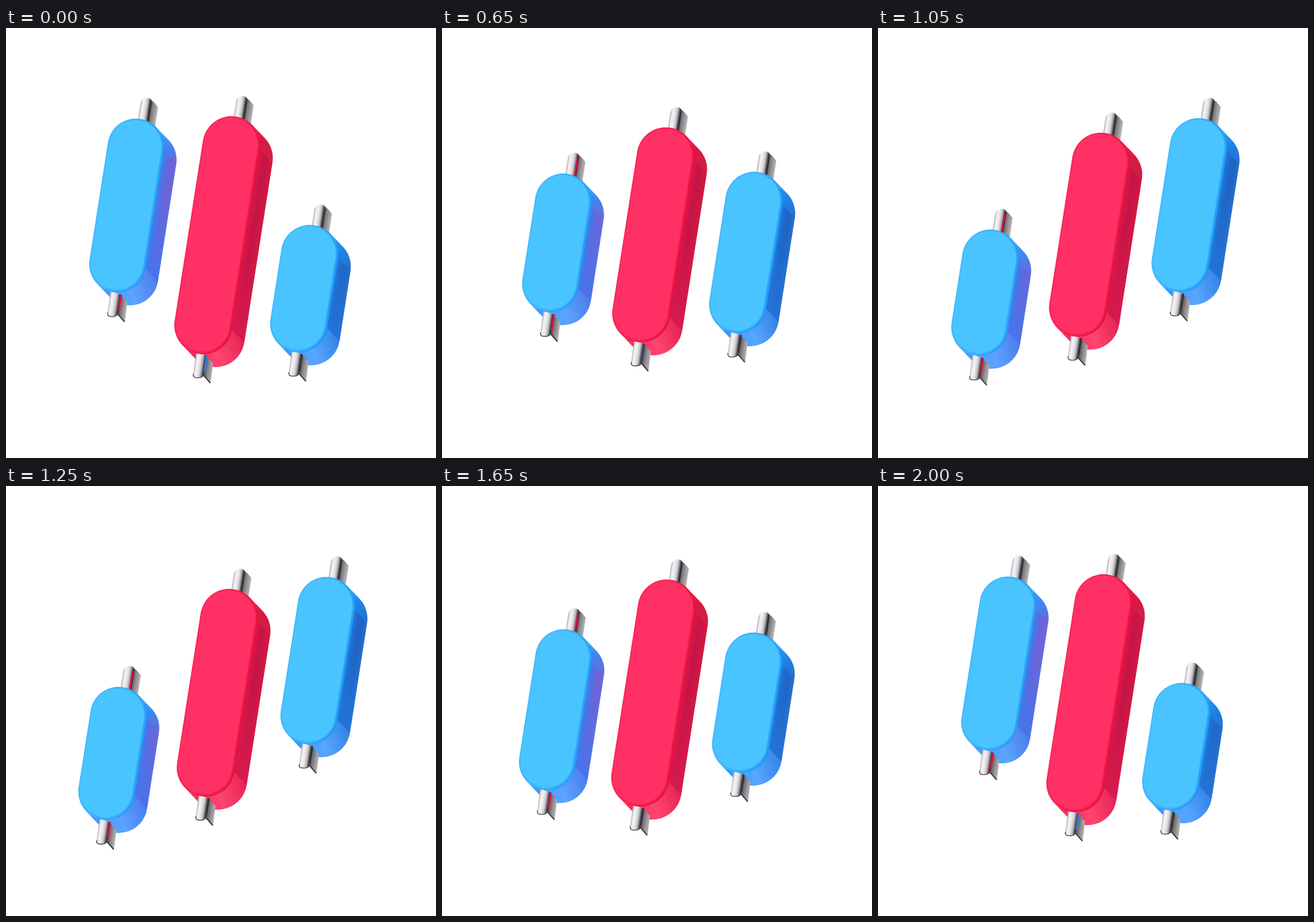
Animation, 700 px wide and 700 px high, one loop 2050 ms. Source, as an HTML page:

```html
<!DOCTYPE html>
<html lang="en">
<head>
<meta charset="utf-8">
<title>Candles</title>
<style>
  html, body { margin: 0; width: 100%; height: 100%; overflow: hidden; background: #fff; }
  svg { display: block; width: 100%; height: 100%; }
</style>
</head>
<body>
<svg id="stage" viewBox="0 0 700 700"></svg>
<script>
const STEP = 50, FRAMES = 41, CYCLE = 40;
const LEAN = 0.157;              // sideways drift per pixel of height
const DEPTH = [20, 21];          // offset from front face to back face
const ACROSS = [0.988, 0.155];   // unit vector across a candle
const EDGE = [0.724, -0.69];     // where the silhouette leaves the front face

// Each end swings as mean + c * cos + s * sin.
const candles = [
  { id: 'left', x: 212.1, r: 46.2, top: [235, -87.5, -42.5], bottom: [479, -48.5, -43],
    face: '#4ac4ff', rim: ['#41b6ff', '#35acff', '#259bf8'],
    flat: ['#3f7cee', '#5b6be0', '#7560d2', '#5f6de2'], low: '#4376ec',
    cap: ['#3aaeff', '#3f86f0', '#6a68da'], foot: ['#4a78ec', '#5ba4ff', '#3f97fb'], glow: '#e0103f' },
  { id: 'middle', x: 367.3, r: 47.2, top: [157, -13.4, -1.5], bottom: [516.8, 14.2, 1.5],
    face: '#ff3164', rim: ['#f92355', '#f31d4d', '#e5123f'],
    flat: ['#d9164a', '#c61447', '#cb1545', '#d11a42'], low: '#d81a50',
    cap: ['#f01e4a', '#d61a42', '#d02146'], foot: ['#e32050', '#ff4570', '#f72350'], glow: '#2f7cf0' },
  { id: 'right', x: 522.4, r: 46.8, top: [236.3, 84.3, 40.5], bottom: [481.8, 46.2, 40.5],
    face: '#4ac4ff', rim: ['#41b6ff', '#35acff', '#1f98f6'],
    flat: ['#1f78dc', '#1d66c8', '#2064c2', '#2670d0'], low: '#2474d8',
    cap: ['#36aaff', '#1d83e6', '#2570cc'], foot: ['#2f80e4', '#58a6ff', '#2b96fb'], glow: '#1c1b22' }
];

const stage = document.getElementById('stage');
const find = id => document.getElementById(id);
const clamp = v => Math.max(0, Math.min(1, v));
const scale = ([x, y], k) => [x * k, y * k];
const plus = (a, b) => [a[0] + b[0], a[1] + b[1]];
const pt = p => p.map(v => v.toFixed(2)).join(' ');

function gradient(id, colours, from, to) {
  const box = from
    ? `gradientUnits="userSpaceOnUse" x1="${from[0]}" y1="${from[1]}" x2="${to[0]}" y2="${to[1]}"` : '';
  const stops = colours.map((c, i) =>
    `<stop offset="${i / (colours.length - 1)}" stop-color="${c}"/>`).join('');
  return `<linearGradient id="${id}" ${box}>${stops}</linearGradient>`;
}

// A strip of the side wall: an arc on the front circle swept back by DEPTH.
function wedge(r, from, to) {
  const a = scale(from, r), b = scale(to, r);
  return `M${pt(a)}L${pt(plus(a, DEPTH))}A${r} ${r} 0 0 1 ${pt(plus(b, DEPTH))}L${pt(b)}` +
    `A${r} ${r} 0 0 0 ${pt(a)}Z`;
}

const topPin = c => `<g transform="skewX(-8.8)">
  <path d="M11 -78L18 -73L26 -65V-18L12 -30Z" fill="url(#shade)"/>
  <path d="M-3.5 -30V-71Q-3.5 -80 5.5 -80Q14.5 -80 14.5 -71V-30Z" fill="url(#steel)"/>
  <path id="${c.id}TopGlow" d="M10.6 -30V-72Q13.6 -72 13.6 -68V-30Z" fill="${c.glow}" opacity="0"/>
</g>`;

const bottomPin = c => `<g transform="skewX(-8.8)">
  <path d="M12 50L25.5 62L26.5 95L12 81Z" fill="url(#shade)"/>
  <path d="M12.5 81L26 94" stroke="#3b393f" stroke-width="1.8"/>
  <path d="M-4.5 44L14 50V78Q14 86 6 86H3Q-4 86 -4 80Z" fill="url(#steel)"/>
  <path d="M-4 79Q-4 85.5 3 85.5H6Q13.5 85.5 13.5 77" fill="none" stroke="#4a474d" stroke-width="1.3"/>
  <path id="${c.id}BottomGlow" d="M12 50H15V76H12Z" fill="${c.glow}" opacity="0"/>
</g>`;

function build(c) {
  const { id, r } = c;
  const side = scale(ACROSS, r);
  const defs = gradient(id + 'RimFill', c.rim, scale(ACROSS, -r), side) +
    gradient(id + 'FlatFill', c.flat, side, scale(ACROSS, r + 23)) +
    gradient(id + 'CapFill', c.cap, scale(EDGE, r), plus(side, DEPTH)) +
    gradient(id + 'FootFill', c.foot, [r + 18, 12], [-r + 16, r]) +
    `<linearGradient id="${id}LowFill" gradientUnits="userSpaceOnUse" x1="2" y1="10" x2="24" y2="-130">
       <stop offset="0" stop-color="${c.low}" stop-opacity=".85"/>
       <stop offset="1" stop-color="${c.low}" stop-opacity="0"/></linearGradient>`;
  const stadium = (paint, width, extra = '') =>
    `<path class="${id}Axis" stroke="${paint}" stroke-width="${width}" stroke-linecap="round" ${extra}/>`;
  return `<defs>${defs}</defs><g id="${id}">
    ${topPin(c)}
    ${stadium(c.flat[2], 2 * r - 1, `transform="translate(${DEPTH})"`)}
    <path id="${id}Wall" fill="url(#${id}FlatFill)"/>
    <path d="${wedge(r, EDGE, ACROSS)}" fill="url(#${id}CapFill)"/>
    <g id="${id}Foot">
      <path id="${id}Fade" fill="url(#${id}LowFill)"/>
      <path d="${wedge(r, ACROSS, scale(EDGE, -1))}" fill="url(#${id}FootFill)"/>
      ${bottomPin(c)}
    </g>
    ${stadium(`url(#${id}RimFill)`, 2 * r)}
    ${stadium(c.face, 2 * r - 4, 'opacity=".4" transform="translate(-.6 -.6)"')}
    ${stadium(c.face, 2 * r - 7, 'transform="translate(-1 -1)"')}
  </g>`;
}

stage.innerHTML = '<defs>' +
  gradient('steel', ['#aaa6ab', '#f3f1f3', '#efedef', '#dedbde', '#b4b0b6', '#4c4951', '#1c1b22']) +
  gradient('shade', ['#4c4a50', '#8c888c', '#b9b5b7']) +
  '</defs>' + candles.map(build).join('');

function ends(c, angle) {
  const swing = ([mean, a, b]) => mean + a * Math.cos(angle) + b * Math.sin(angle);
  return { top: swing(c.top), bottom: swing(c.bottom) };
}

function place(c, { top, bottom }) {
  const { id, r } = c;
  const y = top + r;
  const length = bottom - top - 2 * r;
  const axis = [-LEAN * length, length], up = scale(axis, -1);
  const side = scale(ACROSS, r), back = plus(side, DEPTH);
  const strip = along => `M${pt(side)}L${pt(back)}L${pt(plus(back, along))}L${pt(plus(side, along))}Z`;
  find(id).setAttribute('transform', `translate(${c.x - LEAN * (y - 190)} ${y})`);
  find(id + 'Foot').setAttribute('transform', `translate(${axis})`);
  find(id + 'Wall').setAttribute('d', strip(axis));
  find(id + 'Fade').setAttribute('d', strip(up));
  document.querySelectorAll(`.${id}Axis`).forEach(p => p.setAttribute('d', `M0 0L${pt(axis)}`));
}

function draw(time) {
  const step = Math.floor(time / STEP) % FRAMES;
  const angle = 2 * Math.PI * step / CYCLE;
  const poses = candles.map(c => ends(c, angle));
  candles.forEach((c, i) => place(c, poses[i]));
  // Neighbouring colours mirrored in the metal.
  find('leftTopGlow').setAttribute('opacity', clamp((poses[0].top - 165) / 50));
  find('leftBottomGlow').setAttribute('opacity', 1);
  find('middleBottomGlow').setAttribute('opacity', clamp((poses[2].bottom - 485) / 45));
}

let start = null;
function tick(now) {
  if (start === null) start = now;
  draw(now - start);
  requestAnimationFrame(tick);
}
draw(0);
requestAnimationFrame(tick);
</script>
</body>
</html>
```
